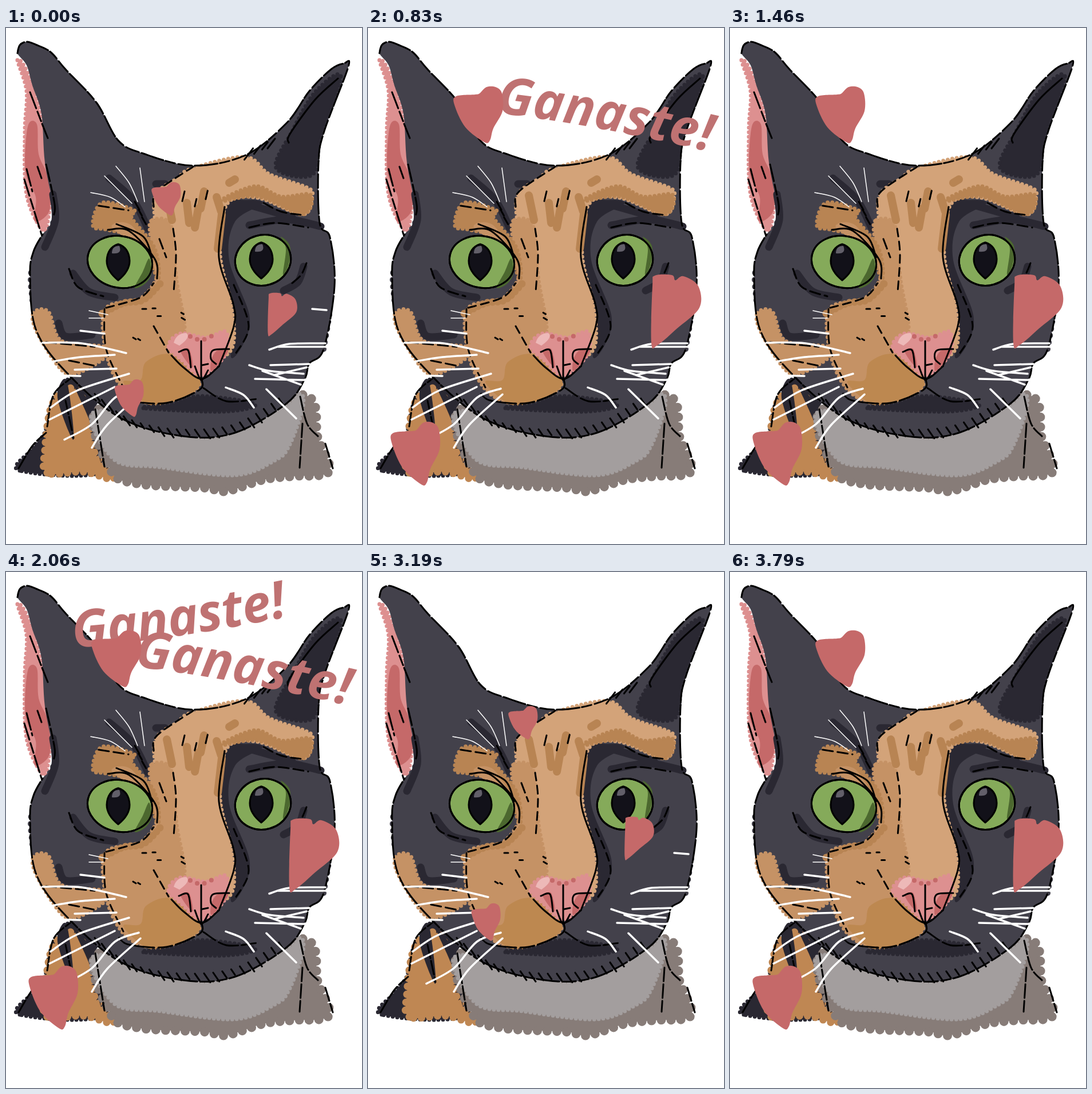
Animation of 622x900 px, one loop 4.09 s. Source, as an HTML page:

```html
<!DOCTYPE html>
<html lang="es">
<head>
<meta charset="utf-8">
<title>Ganaste</title>
<style>
  html, body { margin: 0; width: 100%; height: 100%; overflow: hidden; background: #fff; }
  svg { display: block; width: 622px; height: 900px; }
  path { stroke-linecap: round; stroke-linejoin: round; }
  text { font: italic 700 90px "Open Sans", "Noto Sans", sans-serif; fill: #bf7272; }
</style>
</head>
<body>
<svg viewBox="0 0 622 900">
  <defs>
    <path id="rise" d="M118 132Q300 118 520 72"/>
    <path id="fall" d="M224 148Q400 168 650 228"/>
  </defs>
  <g id="cat"></g>
  <text id="first"><textPath href="#rise">Ganaste!</textPath></text>
  <text id="second"><textPath href="#fall">Ganaste!</textPath></text>
  <g id="hearts"></g>
</svg>
<script>
const $ = id => document.getElementById(id);
const fur = '#43414b', shade = '#2a2832', light = '#d3a379', tan = '#c59265',
      brown = '#b88453', pink = '#dd9090', rose = '#c56969', ink = '#000';
let layer = $('cat');

// Smooth path through points; "/" separates strokes.
function curve(text, closed) {
  return text.split('/').map(part => {
    const n = part.trim().split(/\s+/).map(Number), p = [];
    for (let i = 0; i < n.length; i += 2) p.push([n[i], n[i + 1]]);
    const size = p.length;
    const at = i => closed ? p[(i + size) % size] : p[Math.max(0, Math.min(size - 1, i))];
    let d = 'M' + p[0];
    for (let i = 0; i < (closed ? size : size - 1); i++) {
      const [a, b, c, e] = [at(i - 1), at(i), at(i + 1), at(i + 2)];
      const mix = (from, to, base, k) => base[k] + (to[k] - from[k]) / 6;
      d += 'C' + [mix(a, c, b, 0), mix(a, c, b, 1), mix(e, b, c, 0), mix(e, b, c, 1), ...c];
    }
    return d + (closed ? 'Z' : '');
  }).join('');
}
function draw(d, attrs) {
  const path = document.createElementNS('http://www.w3.org/2000/svg', 'path');
  path.setAttribute('d', d);
  for (const key in attrs) path.setAttribute(key, attrs[key]);
  layer.append(path);
  return path;
}
const shape = (fill, pts) => draw(curve(pts, true), { fill });
const line = (stroke, width, pts, dash = 'none') =>
  draw(curve(pts), { fill: 'none', stroke, 'stroke-width': width, 'stroke-dasharray': dash });
// Fill with a bumpy brushed edge.
const patch = (color, pts, width = 7) => draw(curve(pts, true),
  { fill: color, stroke: color, 'stroke-width': width, 'stroke-dasharray': `0 ${width + 1}` });
// Short hairs at even steps along a curve.
function fringe(pts, step, dx, dy) {
  const guide = line('none', 0, pts);
  for (let s = 0, i = 0; s < guide.getTotalLength(); s += step, i++) {
    const { x, y } = guide.getPointAtLength(s), k = 1 + Math.sin(i * 5) * .25;
    draw(`M${x} ${y}l${dx * k} ${dy * k}`, { stroke: ink, 'stroke-width': 3 });
  }
}

// Shoulders and chest
patch(shade, '24 772 45 735 68 705 80 655 115 610 155 650 175 770');
patch('#bf8753', '72 776 68 735 80 658 112 628 138 655 155 740 188 786 135 774', 13);
shape(shade, '90 645 106 615 118 718');
shape(shade, '120 625 148 660 166 758 148 690');
patch('#877c78', '162 665 182 770 230 795 345 802 385 808 450 788 500 782 564 774 545 715 520 640 350 690', 16);
patch('#a39e9e', '158 668 350 718 480 665 514 638 518 665 494 730 470 754 400 780 270 766 188 752');
line(ink, 3, '22 768 46 729 70 706/72 695 83 640 112 612/104 650 118 715/156 665 172 765/514 643 526 690 545 712/518 690 513 767/558 725 571 768', '24 5');

// Ears and head
patch(pink, '20 56 36 75 60 150 76 270 74 330 64 353 36 290 33 180 36 110');
shape(rose, '38 172 54 168 57 220 73 260 76 318 50 337 52 295 34 250');
const head = `20 44 24 30 36 24 52 29 78 42 104 72 158 130 196 196 240 219 326 240 418 222 490 166
  530 110 568 72 590 62 598 68 556 180 546 235 548 340 566 365 574 450 555 560 530 585 522 612 490 655
  400 706 310 712 200 680 105 600 52 525 42 430 48 390 64 360`;
shape(fur, head + ' 84 330 68 235 62 150 46 100 36 65');
line(fur, 10, '46 475 44 425 64 372 82 340 88 310/555 560 565 500 570 440', '0 12');
patch(shade, '585 84 540 112 500 180 472 244 535 256 550 190');

// Dark fur
line(shade, 13, '180 262 222 300 248 350/262 272 278 272/82 290 86 335 68 382/92 515 104 538 150 535');
line(shade, 13, '117 428 145 460 190 470/425 344 490 334 550 346/430 310 500 330/485 458 510 443 520 416');
shape(shade, '386 310 420 300 448 306 400 338 390 405 425 500 415 550 393 574 398 500 372 405');

// Orange fur
patch(light, `260 330 264 288 300 262 325 245 418 225 460 255 525 278 535 292 518 325 440 296 386 307
  374 395 395 490 394 560 350 575 285 540 275 400`);
patch(brown, '375 302 435 276 480 294 532 291 518 325 440 294');
patch(tan, '256 335 288 345 298 440 312 520 305 572 338 620 300 646 250 654 205 630 176 570 174 490 235 472 266 425 252 360');
line(brown, 13, '168 498 205 480 240 474 270 445', '0 9');
shape('#bd8850', '205 618 235 614 245 582 290 570 340 618 300 648 250 657');
line(brown, 14, '281 292 290 335/316 305 320 340/336 315 330 348/368 295 376 320/346 285 340 315/377 325 370 385/390 270 400 264');
patch(brown, '152 345 168 305 224 318 220 332 260 385 265 438 236 370 178 352');
shape(tan, '185 348 220 345 262 415 264 440 248 395');
patch(tan, '48 497 74 495 97 546 172 556 172 575 122 603 95 594 54 530');
patch(shade, '240 663 290 656 340 642 435 656 380 669');

// Eyes
function eye(cx, cy, rx, ry, tilt, crescent) {
  const ring = `M${cx - rx} ${cy}a${rx} ${ry} 0 1 1 ${2 * rx} 0a${rx} ${ry} 0 1 1 ${-2 * rx} 0`;
  const edge = { stroke: ink, 'stroke-width': 3, transform: `rotate(${tilt} ${cx} ${cy})` };
  draw(ring, { ...edge, fill: '#85aa5a' });
  shape('#4c682f', crescent);
  draw(ring, { ...edge, fill: 'none' });
  const px = cx - 3, pupil = `M${px} ${cy - 31}q19 6 20 29q0 18-20 34q-20-16-20-34q1-23 20-29`;
  draw(pupil, { fill: '#121119', stroke: ink, 'stroke-width': 3 });
  draw(`M${px - 11} ${cy - 15}q0-13 13-13q6 15-13 13`, { fill: '#625f69' });
}
eye(199, 408, 57, 45, 12, '250 402 254 428 243 446 225 453 239 425');
eye(449, 405, 49, 44, -16, '480 364 496 380 494 412 484 430 489 385');
line(ink, 3, '178 352 215 354 260 403 264 437/193 342 240 364 255 400');

// Nose and mouth
patch(pink, '284 555 305 533 350 540 384 530 383 570 342 606 308 580');
shape(rose, '306 566 320 560 326 592');
shape(rose, '359 578 370 562 388 564 360 598');
line(rose, 8, '322 538 342 544 368 533', '0 13');
draw('M293 549q5-17 22-17q9 7-12 22z', { fill: '#edb9b8' });
line(ink, 3, '289 571 310 592 342 612 372 590/302 565 318 562 323 592/390 560 362 562 358 577 367 586/341 546 341 610/343 588 353 586/330 590 341 614 353 597');
line(ink, 3, '342 612 338 631 280 654 215 650 197 637/345 628 385 651 438 647', '25 7 35 6');

// Outlines and fur marks
line(ink, 3, head, '24 5 40 4 17 6');
line(ink, 3, '580 88 540 125 496 185 494 200/382 312 372 400 397 481 398 520 372 590');
line(ink, 3, '42 112 63 167 73 192/36 246 46 285/55 242 62 262/70 238 85 308 82 330/32 264 62 360', '30 6 18 5');
line(ink, 3, '398 448 424 520 400 570/292 350 297 395 293 460/258 520 284 566/258 312 264 285 327 242/172 490 175 560 205 627/175 488 235 470 258 445', '14 9');
line(ink, 3, '110 420 126 452 170 468/525 410 516 430 500 445/425 348 470 340 528 348/450 305 480 320 515 326/268 368 280 400/162 310 214 318/70 548 155 556/110 580 160 590', '18 8');
fringe('155 638 215 682 300 700 400 691 486 640', 16, 9, 13);
fringe('312 285 336 298 364 270', 25, -4, 17);
fringe('470 193 440 207 424 212', 14, -13, 17);
fringe('225 303 240 335', 15, 8, 14);
fringe('238 490 260 490 265 505', 18, 7, 0);
fringe('222 540 238 544/306 495 307 508', 9, 5, 3);

// Whiskers
line('#fff', 1.5, '192 241 215 270 230 303/172 258 220 306/148 287 182 295 208 312/234 244 242 303/145 493 178 500/145 506 170 506');
line('#fff', 3.5, '64 549 132 550 210 567/80 582 130 574 190 570/90 606 130 607/120 596 193 594/78 662 125 632 215 603/76 683 190 626/102 718 150 691 190 645 232 629/150 732 177 692 235 639/130 528 172 533');
line('#fff', 3.5, '460 561 495 551 558 550/475 556 560 556/425 588 460 598 520 603/435 612 522 614/462 588 530 586/448 598 515 622/470 605 525 592/535 490 560 492/384 627 415 640 433 662/455 630 507 681');

// Hearts
layer = $('hearts');
const heart = '195 114 207 103 223 103 234 114 235 145 219 175 213 196 203 199 170 173 151 134 154 119 187 116';
shape(rose, heart);
shape(rose, heart).setAttribute('transform', 'translate(-109 573) scale(.995 1.12)');
shape(rose, '497 450 501 432 531 431 537 440 551 433 577 450 579 488 540 524 506 553 495 549');

const pulses = [[230, 530], [830, 1130], [1460, 1760], [2060, 2360], [2660, 2960], [3260, 3560], [3790, 4090]];
function place(node, visible, y) {
  node.setAttribute('visibility', visible ? 'visible' : 'hidden');
  node.setAttribute('transform', `translate(0 ${y})`);
}
function render() {
  const t = performance.now() % 4090, within = (a, b) => t >= a && t < b;
  const big = pulses.some(([a, b]) => within(a, b));
  const shift = t < 700 ? 'translate(9 35)' : '';
  $('hearts').setAttribute('transform', shift + (big ? '' : 'translate(157.5 174) scale(.588)'));
  place($('first'), within(230, 700) || within(1630, 2090), t < 700 ? -13 : 0);
  place($('second'), within(830, 1290) || within(2060, 2530), t < 1400 ? 0 : 17);
  requestAnimationFrame(render);
}
render();
</script>
</body>
</html>
```
